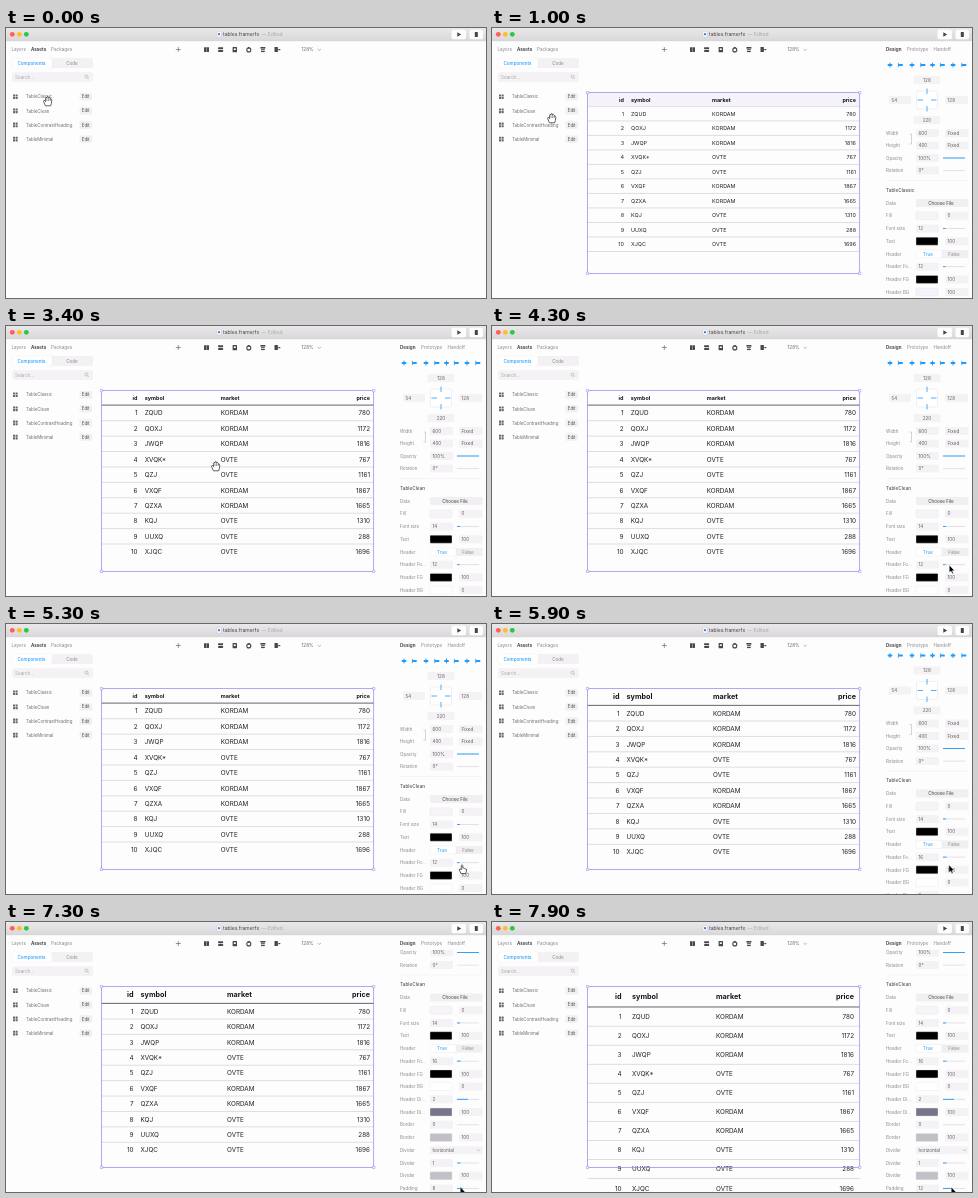
Animation, 480 px wide and 270 px high, one loop 8 s. Source, as an HTML page:

```html
<!DOCTYPE html>
<html lang="en">
<head>
<meta charset="utf-8">
<title>Table components</title>
<style>
html, body { margin: 0; width: 100%; height: 100%; overflow: hidden; background: #fefdfe; }
svg { display: block; width: 480px; height: 270px; }
text { font-family: Inter, "Liberation Sans", sans-serif; white-space: pre; }
</style>
</head>
<body>
<svg viewBox="0 0 480 270" xmlns="http://www.w3.org/2000/svg">
  <defs>
    <linearGradient id="bar" x2="0" y2="1">
      <stop offset="0" stop-color="#eae8ea"/><stop offset="1" stop-color="#d9d7d9"/>
    </linearGradient>
    <clipPath id="side"><rect x="390" y="28" width="90" height="242"/></clipPath>
  </defs>
  <rect width="480" height="270" fill="#fefdfe"/>
  <g id="table"></g>
  <g id="chrome"></g>
  <g id="panel"></g>
  <g id="cursor"></g>
</svg>
<script>
const LOOP = 8000, TICK = 100, UNIT = 0.4533;
const $ = id => document.getElementById(id);
const BLUE = '#1f9bff', GREY = '#8a878c', DARK = '#39363b', PURPLE = '#6b46c1';

// ---- drawing helpers -------------------------------------------------
// Text centred vertically on y by its cap height.
function label(x, y, str, { size = 4.6, fill = GREY, weight = 400, anchor = 'start' } = {}) {
  return `<text x="${x}" y="${(y + size * 0.364).toFixed(2)}" font-size="${size.toFixed(2)}" fill="${fill}" font-weight="${weight}" text-anchor="${anchor}">${str}</text>`;
}
const box = (x, y, w, h, fill, r = 0, extra = '') =>
  `<rect x="${x}" y="${y}" width="${w}" height="${h}" rx="${r}" fill="${fill}" ${extra}/>`;
const line = (x1, y1, x2, y2, stroke, width = 0.5) =>
  `<path d="M${x1} ${y1}L${x2} ${y2}" stroke="${stroke}" stroke-width="${width}"/>`;
const path = (d, stroke, width = 0.6, fill = 'none') =>
  `<path d="${d}" fill="${fill}" stroke="${stroke}" stroke-width="${width}"/>`;

const clamp = v => Math.min(1, Math.max(0, v));
const span = (t, a, b) => clamp((t - a) / (b - a));
const ease = p => p * p * (3 - 2 * p);
const mix = (a, b, p) => a + (b - a) * p;

// ---- window chrome and left sidebar -----------------------------------
function drawChrome() {
  let s = box(0, 0, 480, 13, 'url(#bar)') + line(0, 13, 480, 13, '#d0ced0', 0.4);
  ['#ff5f57', '#febc2e', '#28c840'].forEach((c, i) => {
    s += `<circle cx="${6.3 + i * 7}" cy="6.3" r="2.4" fill="${c}"/>`;
  });
  s += box(211, 3.6, 4, 5.4, '#fff', 0.5, 'stroke="#aaa" stroke-width=".3"') + box(212, 5.2, 2, 2, '#3b7de0');
  s += label(217, 6.4, 'tables.framerfx', { size: 5, fill: '#444' });
  s += label(254, 6.4, ' — Edited', { size: 5, fill: '#aaa' });
  s += box(445.5, 1.8, 14.5, 9.4, '#fdfdfd', 1.8) + path('M451.3 4.3L455.2 6.5L451.3 8.7Z', 'none', 0, '#444');
  s += box(463.5, 1.8, 13.5, 9.4, '#fdfdfd', 1.8) + box(468.8, 4, 3, 5, '#444', 0.5);

  s += label(5.5, 21.7, 'Layers') + label(25, 21.7, 'Assets', { fill: DARK, weight: 600 }) + label(45, 21.7, 'Packages');
  s += path('M169.8 21.5H174.8M172.3 19V24', '#555');
  for (let i = 0; i < 6; i++) {
    const x = 198 + i * 14.1, c = '#4a474c';
    if (i === 0) s += box(x, 19.2, 5, 4.8, c, 0.4) + line(x + 2.5, 19.2, x + 2.5, 24, '#fff', 0.4);
    if (i === 1) s += box(x, 19.2, 5, 2, c, 0.4) + box(x, 22, 5, 2, c, 0.4);
    if (i === 2) s += box(x + 0.4, 19, 4.4, 5.2, c, 0.5) + box(x + 1.6, 20.4, 2, 1.6, '#fff');
    if (i === 3) s += `<circle cx="${x + 2.5}" cy="21.9" r="2" fill="none" stroke="${c}" stroke-width="1.1"/>` + box(x + 1.6, 19, 1.8, 1.6, c);
    if (i === 4) s += box(x, 19, 5, 1.6, c) + box(x + 0.6, 21.2, 3.8, 1.1, c) + box(x + 0.6, 23, 3.8, 1.1, c);
    if (i === 5) s += box(x, 19.1, 3.4, 5, c, 0.3) + box(x + 3.8, 21, 2, 1.2, c);
  }
  s += label(295.5, 21.7, '128%', { fill: '#666' }) + path('M311.5 21L313.2 22.5L314.9 21', '#777', 0.5);

  s += box(6, 30, 81, 10, '#f3f1f3', 2) + box(6, 30, 40, 10, '#fff', 2, 'stroke="#ececee" stroke-width=".4"');
  s += label(25.5, 35, 'Components', { fill: BLUE, weight: 500, anchor: 'middle' });
  s += label(66, 35, 'Code', { anchor: 'middle' });
  s += box(6, 44.3, 81, 9.6, '#f4f2f4', 2) + label(9, 49, 'Search…', { fill: '#aaa7ac' });
  s += '<circle cx="80.5" cy="48.6" r="1.5" fill="none" stroke="#999" stroke-width=".5"/>' + line(81.6, 49.7, 82.8, 50.9, '#999');

  ['TableClassic', 'TableClean', 'TableContrastHeading', 'TableMinimal'].forEach((name, i) => {
    const y = 68.8 + i * 14.1;
    for (let k = 0; k < 4; k++) s += box(7 + (k % 2) * 2.6, y - 2.4 + (k >> 1) * 2.6, 2.1, 2.1, '#6a676c', 0.3);
    s += label(20, y, name, { size: 4.4, fill: '#6f6c72' });
    s += box(73.5, y - 3.7, 12.5, 7.4, '#f1eff1', 1.3) + label(79.7, y, 'Edit', { size: 4.3, fill: '#4c494e', anchor: 'middle' });
  });
  return s;
}

// ---- right inspector ----------------------------------------------------
const field = (x, y, w, str, anchor) => box(x, y - 4, w, 8, '#f4f2f4', 1.3) +
  (anchor ? label(x + w / 2, y, str, { fill: '#605d62', anchor }) : label(x + 2.5, y, str, { fill: '#605d62' }));

function slider(y, p) {
  return line(451, y, 473, y, '#dcdade', 0.8) + line(451, y, 451 + 22 * p, y, BLUE, 0.9);
}

function alignIcons(y) {
  let s = '';
  [398, 408.5, 420, 431, 440.5, 450.5, 461, 472].forEach((x, i) => {
    const wide = i % 2 === 0;
    s += box(x - 2.3, y - 0.9, 4.6, 1.8, BLUE, 0.3);
    s += wide ? box(x - 0.5, y - 2.4, 1, 4.8, BLUE) : box(x - 2.6, y - 2.2, 0.8, 4.4, BLUE);
  });
  return s;
}

function drawPanel(st) {
  let s = alignIcons(37);
  s += field(421.5, 52, 27, '128', 'middle') + field(397, 72, 22, '54') + field(453, 72, 23, '128') + field(421.5, 92, 27, '220', 'middle');
  s += box(424.5, 63, 21, 18, '#fff', 1.5, 'stroke="#e2e0e4" stroke-width=".5"');
  s += path('M435 60.5V66M435 78V83.5M425.5 72H431M439 72H444.5', BLUE, 0.8);

  const head = (y, name) => label(394, y, name, { size: 4.5 });
  s += head(105, 'Width') + field(424, 105, 23, '600') + field(453, 105, 23.5, 'Fixed');
  s += head(117.5, 'Height') + field(424, 117.5, 23, '400') + field(453, 117.5, 23.5, 'Fixed');
  s += path('M417.5 106H419.5V116H417.5', '#aaa', 0.5);
  s += head(130, 'Opacity') + field(424, 130, 23, '100%') + slider(130, 1);
  s += head(142.6, 'Rotation') + field(424, 142.6, 23, '0°') + slider(142.6, 0);
  s += line(394, 152.5, 476, 152.5, '#ebe9ed', 0.5);
  s += label(394, 162, st.name, { size: 4.7, fill: '#555257', weight: 500 });

  let y = 175 - 12.73;
  const row = name => { y += 12.73; s += head(y, name); };
  const num = (name, v, max) => { row(name); s += field(424, y, 23, v) + slider(y, v / max); };
  const swatch = (name, c, v) => {
    row(name);
    s += box(424, y - 4, 22, 8, c, 0.8, 'stroke="#e4e2e6" stroke-width=".4"') + field(453, y, 23.5, v);
  };
  row('Data');
  s += box(424, y - 4, 52.5, 8, '#f1eff1', 1.3) + label(449, y, 'Choose File', { fill: '#444146', anchor: 'middle' });
  swatch('Fill', '#f6f4f6', 0);
  num('Font size', st.font, 100);
  swatch('Text', '#000', 100);
  row('Header');
  s += box(424, y - 4, 52.5, 8, '#f1eff1', 1.3) + box(424, y - 4, 26, 8, '#fff', 1.3, 'stroke="#e8e6ea" stroke-width=".4"');
  s += label(436, y, 'True', { fill: BLUE, anchor: 'middle' }) + label(462, y, 'False', { anchor: 'middle' });
  num('Header Fo…', st.head, 100);
  swatch('Header FG', st.fg, 100);
  swatch('Header BG', st.bg, st.bg === '#ffffff' ? 0 : 100);
  num('Header Di…', 2, 4);
  swatch('Header Di…', '#77758a', 100);
  num('Border', 0, 10);
  swatch('Border', '#c2c0c6', 100);
  row('Divider');
  s += field(424, y, 52.5, 'horizontal') + path(`M471 ${y - 0.7}L472.4 ${y + 0.7}L473.8 ${y - 0.7}`, '#888', 0.5);
  num('Divider', 1, 6);
  swatch('Divider', '#c2c0c6', 100);
  num('Padding', st.pad, 30);

  return label(394, 21.7, 'Design', { fill: DARK, weight: 600 }) + label(415, 21.7, 'Prototype') + label(441.5, 21.7, 'Handoff') +
    `<g clip-path="url(#side)"><g transform="translate(0 ${-99.5 * st.scroll})">${s}</g></g>`;
}

// ---- data table -----------------------------------------------------------
const A = 'KORDAM', B = 'OVTE';
const ROWS = [
  ['ZQUD', A, 780], ['QOXJ', A, 1172], ['JWQP', A, 1816], ['XVQK*', B, 767], ['QZJ', B, 1161],
  ['VXQF', A, 1867], ['QZXA', A, 1665], ['KQJ', B, 1310], ['UUXQ', B, 288], ['XJQC', B, 1696]
];
const LINE_HEIGHT = { 12: 15, 13: 16, 14: 17, 15: 18, 16: 20 };
const LEFT = 95.5, TOP = 64.6, RIGHT = 367.7, BOTTOM = 245.4;

function cells(values, y, cols, opts) {
  return values.map((v, i) =>
    label(cols[i].toFixed(2), y, v, { ...opts, anchor: i % 3 ? 'start' : 'end' })).join('');
}

function drawTable(st) {
  const names = ['id', 'symbol', 'market', 'price'];
  const contrast = st.name === 'TableContrastHeading', clean = st.name === 'TableClean';
  const headH = (LINE_HEIGHT[st.head] + 2 * st.pad) * UNIT;
  let rowH = (LINE_HEIGHT[st.font] + 2 * st.pad + 1) * UNIT;
  let cy = TOP + headH / 2, y = TOP + headH, s = '';

  if (contrast) {
    [[97, 39], [138, 78.5], [218.3, 84], [304.6, 60.6]].forEach(([x, w]) => { s += box(x, 66.6, w, 17.2, PURPLE, 1.6); });
    cy = 75.2; y = 85.9; rowH = 19.38;
  } else if (clean) {
    y += 2 * UNIT;
    s += line(LEFT, y - UNIT, RIGHT, y - UNIT, '#55535f', 2 * UNIT);
  } else {
    s += box(LEFT, TOP, RIGHT - LEFT, headH, st.bg) + line(LEFT, y, RIGHT, y, '#c9c6d2', 0.5);
  }
  s += cells(names, cy, st.cols, { size: st.head * UNIT, fill: contrast ? '#fff' : '#161418', weight: 700 });
  ROWS.forEach((r, i) => {
    s += cells([i + 1, ...r], y + rowH / 2 - 0.1, st.cols, { size: st.font * UNIT, fill: '#222024' });
    y += rowH;
    if (!contrast && (!clean || i < 9)) s += line(LEFT, y - 0.25, RIGHT, y - 0.25, '#bdbac2', 0.5);
  });

  s += box(LEFT, TOP, RIGHT - LEFT, BOTTOM - TOP, 'none', 0, 'stroke="#9384ee" stroke-width=".7"');
  for (const x of [LEFT, RIGHT]) for (const b of [TOP, BOTTOM])
    s += box(x - 1.2, b - 1.2, 2.4, 2.4, '#fff', 0.4, 'stroke="#8674ea" stroke-width=".5"');
  return s;
}

// ---- state over time -------------------------------------------------------
function stateAt(t) {
  if (t < 500) return null;
  if (t < 1800) return { name: 'TableClassic', font: 12, head: 12, pad: 8, fg: '#000', bg: '#f5f2fb', scroll: 0, cols: [132, 139, 220, 364] };
  if (t < 3300) return { name: 'TableContrastHeading', font: 14, head: 14, pad: 12, fg: '#fff', bg: PURPLE, scroll: 0, cols: [132, 143, 222, 361] };
  const grow = Math.round(4 * span(t, 5350, 5800)) / 4;
  const pad = Math.round(mix(8, 12, span(t, 7400, 7900)));
  const small = [131.5, 138.7, 214.8, 364], big = [127.5, 134.5, 221, 364], airy = [129.5, 140, 224, 362];
  const cols = small.map((c, i) => mix(mix(c, big[i], grow), airy[i], (pad - 8) / 4));
  return { name: 'TableClean', font: 14, head: 12 + 4 * grow, pad, fg: '#000', bg: '#ffffff', scroll: ease(span(t, 5850, 6200)), cols };
}

// ---- cursor ------------------------------------------------------------------
const SHAPES = {
  grab: path('M-2.6 4.8L-4.4 .6Q-4.6-.8-3.2-.4L-2.4.6V-3Q-1.8-4.4-1-3V-4Q-.2-5.2.6-4V-3.2Q1.4-4.2 2.2-2.8V-1.8Q3.6-2.4 3.8-.8L3.4 2.4L2.6 4.8Z', '#222', 0.7, '#fff') +
    path('M-1-2.6V0M.6-2.8V0M2.2-1.8V0', '#222', 0.45),
  point: path('M-2 4.6L-3.8 .8Q-3.8-.4-2.4.2L-1.7 1V-3.6Q-1-5-.2-3.6V-.8Q.6-1.4 1.2-.5Q2-1 2.5-.1Q3.6-.3 3.6 1L2.8 4.6Z', '#222', 0.7, '#fff'),
  arrow: path('M-1.8-4V3.6L0 2.1L1.2 4.8L2.4 4.2L1.3 1.7H3.6Z', '#fff', 0.5, '#000')
};
// time, x, y, shape held until the next stop
const STOPS = [
  [0, 42, 73, 'grab'], [100, 44, 74, 'grab'], [500, 205, 135, 'grab'], [600, 205, 135, 'arrow'],
  [900, 64, 92, 'grab'], [1000, 60, 90, 'grab'], [1200, 50, 101, 'grab'], [1800, 210, 140, 'grab'],
  [2000, 210, 140, 'arrow'], [2500, 60, 88, 'grab'], [2600, 58, 87, 'grab'], [2900, 58, 87, 'grab'],
  [3300, 210, 140, 'grab'], [3500, 210, 140, 'arrow'], [4200, 459, 243, 'arrow'], [4500, 459, 243, 'point'],
  [5300, 457, 245, 'point'], [5800, 460, 245, 'arrow'], [6200, 451.5, 244, 'arrow'], [6600, 451.5, 244, 'arrow'],
  [7000, 456, 268, 'arrow'], [7400, 456, 269, 'arrow'], [7900, 461, 269, 'arrow'], [8000, 461, 269, 'arrow']
];

function drawCursor(t) {
  const i = STOPS.findIndex((s, k) => k === STOPS.length - 2 || STOPS[k + 1][0] > t);
  const [t0, x0, y0, shape] = STOPS[i], [t1, x1, y1] = STOPS[i + 1];
  const p = ease(span(t, t0, t1));
  return `<g transform="translate(${mix(x0, x1, p)} ${mix(y0, y1, p)})" stroke-linejoin="round">${SHAPES[shape]}</g>`;
}

// ---- loop ----------------------------------------------------------------------
let shown = -1;
function render(now) {
  const t = Math.floor((now % LOOP) / TICK) * TICK;
  if (t !== shown) {
    shown = t;
    const st = stateAt(t);
    $('table').innerHTML = st ? drawTable(st) : '';
    $('panel').innerHTML = st ? drawPanel(st) : '';
    $('cursor').innerHTML = drawCursor(t);
  }
}
const start = performance.now();
function frame() {
  render(performance.now() - start);
  requestAnimationFrame(frame);
}
$('chrome').innerHTML = drawChrome();
frame();
</script>
</body>
</html>
```
